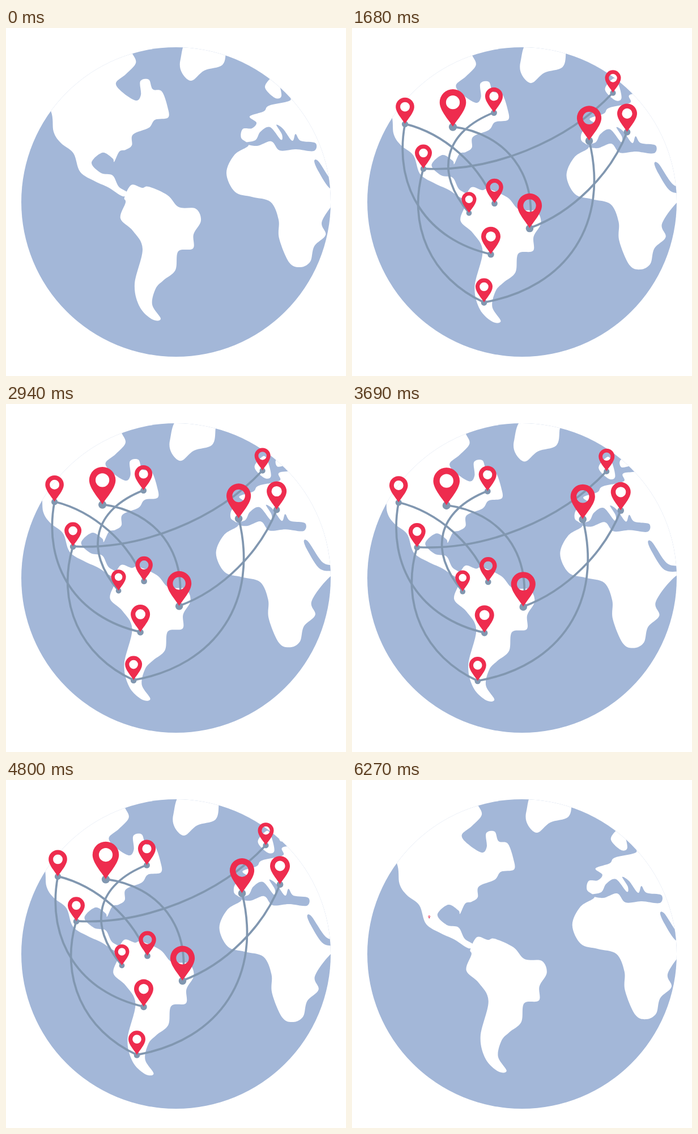
An HTML page that plays this animation: 600x614 px, repeating every 6300 ms.

```html
<!DOCTYPE html>
<html lang="en">
<head>
<meta charset="utf-8">
<title>Connected globe</title>
<style>
  html, body { margin: 0; width: 100%; height: 100%; overflow: hidden; background: #fff; }
  svg { display: block; width: 100%; height: 100%; }
  #globe, #sea { fill: #a3b7d8; }
  #land { fill: #fff; }
  #lines { fill: none; stroke: #8197b0; stroke-width: 3.7; }
</style>
</head>
<body>
<svg viewBox="0 0 600 614">
  <clipPath id="disc"><circle cx="300" cy="307" r="273"/></clipPath>
  <circle id="globe" cx="300" cy="307" r="273"/>
  <g clip-path="url(#disc)">
    <g class="drift"><g id="land"></g><g id="sea"></g></g>
  </g>
  <g class="drift"><g id="lines"></g><g id="pins"></g></g>
</svg>
<script>
const LOOP = 6300, TURN = 3600, STEP = 30;
const PIN_TIME = 165, GROW = 550, SHRINK = 480;
const $ = id => document.getElementById(id);

function add(parent, tag, attrs) {
  const el = document.createElementNS('http://www.w3.org/2000/svg', tag);
  for (const k in attrs) el.setAttribute(k, attrs[k]);
  return parent.appendChild(el);
}

// Closed smooth curve through a few key points
function smooth(text) {
  const p = text.trim().split(/\s+/).map(s => s.split(',').map(Number));
  const at = i => p[(i + p.length) % p.length];
  let d = 'M' + p[0];
  p.forEach((a, i) => {
    const z = at(i - 1), b = at(i + 1), c = at(i + 2);
    const c1 = a.map((v, k) => v + (b[k] - z[k]) / 6);
    const c2 = b.map((v, k) => v - (c[k] - a[k]) / 6);
    d += `C${c1} ${c2} ${b}`;
  });
  return d + 'Z';
}

const shapes = {
  land: {
    northAmerica: `50,100 79,146 84,183 97,203 119,221 131,254 158,271 180,281 206,297
      214,290 199,280 188,260 168,256 151,238 170,220 188,230 191,236 200,218 211,215
      222,207 224,188 252,176 263,162 286,158 285,139 275,112 259,108 252,91 237,94
      238,118 229,128 205,113 194,97 212,81 229,62 223,45 212,25 100,20`,
    southAmerica: `209,299 221,277 240,282 252,280 285,295 305,316 335,319 344,340 331,364
      330,389 304,394 299,427 278,445 264,460 258,488 273,513 258,514 236,492 227,452
      241,390 224,358 202,336 211,308`,
    greenland: '324,18 308,55 310,78 327,93 350,75 382,65 388,38 386,22',
    britain: '472,85 457,104 474,123 486,120 480,93',
    norway: '496,90 497,103 512,101 530,98 520,80',
    europeAfrica: `428,207 403,224 389,256 404,289 434,298 467,307 481,338 482,371 500,414
      520,422 537,412 544,385 564,365 558,340 592,296 640,270 640,120 510,112 501,128
      464,137 455,147 430,156 442,167 434,177 418,178 415,194`
  },
  sea: {
    mediterranean: `420,203 440,198 449,183 466,175 485,197 487,188 477,171 489,178 505,199
      511,187 520,199 546,203 543,217 512,214 483,216 468,200 443,208`,
    redSea: '544,235 552,254 573,284 600,286 600,278 577,272 552,236'
  }
};
for (const layer in shapes)
  for (const name in shapes[layer]) add($(layer), 'path', { d: smooth(shapes[layer][name]) });

// Pins in order of appearance: x, y of the tip, head radius
const places = {
  mexico: [136.5, 244, 15], california: [104, 165, 16.3], canada: [188.5, 170, 23.3],
  labrador: [261, 145, 15.6], iberia: [429, 194.5, 21.6], balkans: [496, 179, 17.5],
  britain: [471, 110, 14], guiana: [262, 305, 15.3], patagonia: [243.5, 480, 15],
  peru: [217, 322, 13], bolivia: [255.5, 395, 17], brazil: [324, 349, 21.6]
};

// Symmetric arc between two places; bend is its height over the chord
function arc(from, to, bend) {
  const [ax, ay] = places[from], [bx, by] = places[to];
  const dx = bx - ax, dy = by - ay, h = bend * 4 / 3 / Math.hypot(dx, dy);
  const control = f => [ax + dx * f - dy * h, ay + dy * f + dx * h];
  return `M${ax} ${ay}C${control(.3)} ${control(.7)} ${bx} ${by}`;
}

// Routes: from, to, bend, start; the last one is the first to withdraw
const lines = [
  ['mexico', 'britain', 38, 300],
  ['balkans', 'brazil', -25, 545],
  ['labrador', 'peru', 58, 555],
  ['california', 'bolivia', 60, 555],
  ['iberia', 'patagonia', -82, 630],
  ['guiana', 'california', 25, 720],
  ['canada', 'brazil', -51, 930],
  ['patagonia', 'mexico', -51, 875]
].map(([from, to, bend, start], i, all) => ({
  start,
  end: 5210 + 70 * (all.length - 1 - i),
  el: add($('lines'), 'path', { d: arc(from, to, bend), pathLength: 1 })
}));

const teardrop = 'M0 0C-.25 -.45 -1 -1.2 -1 -1.84A1 1 0 0 1 1 -1.84C1 -1.2 .25 -.45 0 0Z'
  + 'M-.52 -1.84a.52 .52 0 0 0 1.04 0a.52 .52 0 0 0 -1.04 0Z';
const pins = Object.values(places).map(([x, y, r], i) => {
  const el = add($('pins'), 'g', {});
  add(el, 'circle', { r: 2 + r * .22, cy: .5, fill: '#8197b0' });
  add(el, 'path', { d: teardrop, transform: `scale(${r})`, fill: '#ee2c4e', 'fill-rule': 'evenodd' });
  return { x, y, start: 30 + 89 * i, end: 6290 - PIN_TIME - 53 * i, el };
});

const clamp = v => Math.max(0, Math.min(1, v));
const presence = (t, item, grow, shrink) =>
  Math.min(clamp((t - item.start) / grow), 1 - clamp((t - item.end) / shrink));

function draw(now) {
  const t = Math.floor(now % LOOP / STEP) * STEP;
  const k = t < TURN ? t / TURN : (LOOP - t) / (LOOP - TURN);
  for (const g of document.querySelectorAll('.drift'))
    g.setAttribute('transform', `translate(${-22.5 * k} ${8.8 * k})`);
  for (const l of lines) {
    const p = presence(t, l, GROW, SHRINK);
    l.el.style.display = p ? '' : 'none';
    l.el.setAttribute('stroke-dasharray', p < 1 ? `${p} 2` : 'none');
  }
  for (const p of pins) {
    const s = presence(t, p, PIN_TIME, PIN_TIME);
    p.el.style.display = s ? '' : 'none';
    p.el.setAttribute('transform', `translate(${p.x} ${p.y}) scale(${s})`);
  }
}

const begin = performance.now();
(function tick() {
  draw(performance.now() - begin);
  requestAnimationFrame(tick);
})();
</script>
</body>
</html>
```
